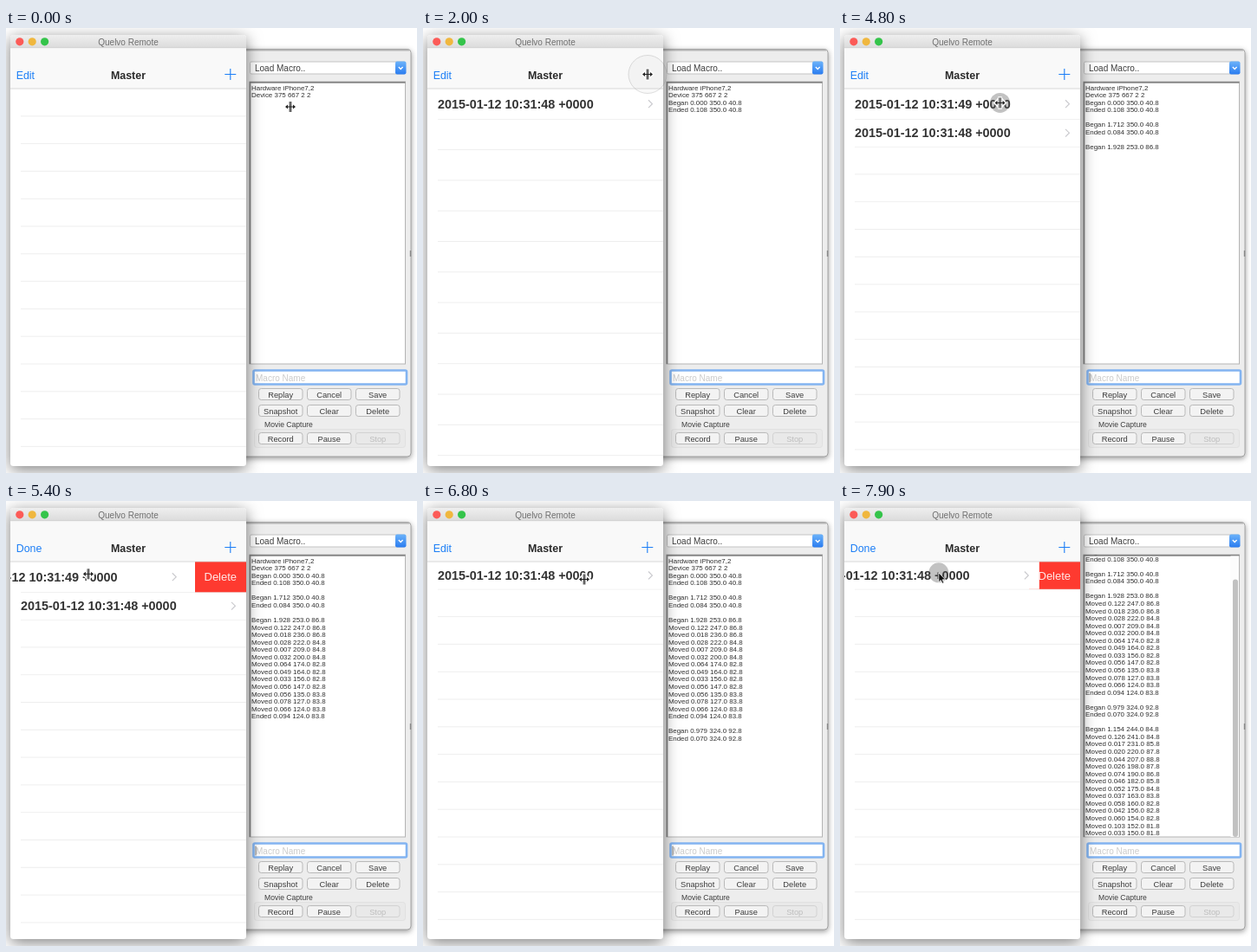
Write an HTML page that moves like this. It is 474x514 px and loops after 8 s.

```html
<!DOCTYPE html>
<html lang="en">
<head>
<meta charset="utf-8">
<title>Touch macro recorder</title>
<style>
  html, body { margin: 0; width: 100%; height: 100%; overflow: hidden; background: #fff; }
  svg { display: block; width: 474px; height: 514px; font-family: "Liberation Sans", Arial, sans-serif; }
  text { white-space: pre; }
  .panel { filter: drop-shadow(0 2px 3px rgba(0,0,0,.4)); }
  .phone { filter: drop-shadow(0 4px 9px rgba(0,0,0,.5)); }
</style>
</head>
<body>
<svg id="stage" viewBox="0 0 474 514">
  <defs>
    <linearGradient id="bar" x2="0" y2="1"><stop stop-color="#efefef"/><stop offset="1" stop-color="#dbdbdb"/></linearGradient>
    <linearGradient id="blue" x2="0" y2="1"><stop stop-color="#6cb3fa"/><stop offset="1" stop-color="#2a7cf0"/></linearGradient>
    <clipPath id="listClip"><path d="M5 23H277V506H5Z"/></clipPath>
    <clipPath id="logClip"><path d="M282 62.5H461V388H282Z"/></clipPath>
  </defs>
  <g id="panel"></g>
  <g clip-path="url(#logClip)"><g id="log"></g></g>
  <g id="scroller">
    <path d="M450.5 63.5H460V388H450.5Z" fill="#fcfcfc"/>
    <rect id="thumb" x="453" width="6" rx="3" fill="#c1c1c1"/>
  </g>
  <g id="phone"></g>
  <g clip-path="url(#listClip)"><g id="empty"></g><g id="rows"></g></g>
  <g id="nav"></g>
  <circle id="touch"/>
  <g id="cursor">
    <g id="split">
      <path d="M-1.6-6.5H1.6V-2H3V-4L7 0L3 4V2H1.6V6.5H-1.6V2H-3V4L-7 0L-3-4V-2H-1.6Z" fill="#fff" stroke="#fff" stroke-width="1.4"/>
      <path d="M-.8-6V6M.8-6V6M-5 0H5" stroke="#222" stroke-width="1" fill="none"/>
      <path d="M-6 0L-3-2.6V2.6ZM6 0L3-2.6V2.6Z" fill="#222"/>
    </g>
    <path id="arrow" d="M0 0V11L2.5 8.7L4.2 12.5L6 11.7L4.4 8H7.8Z" fill="#111" stroke="#fff" stroke-width=".8"/>
  </g>
</svg>
<script>
const LOOP = 8000, TOP = 70, BASE = 31.8, EXTRA = 3.5, REVEAL = 59, LINE = 8.55;
const $ = id => document.getElementById(id);
const clamp = v => Math.max(0, Math.min(1, v));
const ease = v => { v = clamp(v); return v * v * (3 - 2 * v); };
const out = v => 1 - (1 - clamp(v)) ** 3;
const lerp = (a, b, k) => a + (b - a) * k;

function el(parent, tag, attrs, content = '') {
  const node = document.createElementNS('http://www.w3.org/2000/svg', tag);
  set(node, attrs);
  node.textContent = content;
  return parent.appendChild(node);
}
function set(node, attrs) {
  for (const k in attrs) node.setAttribute(k, attrs[k]);
}
// y is the middle of the line
function label(parent, content, x, y, size, fill, more = {}) {
  return el(parent, 'text', { x, y: y + size * .36, 'font-size': size, fill, ...more }, content);
}
const rect = (parent, x, y, width, height, fill, more = {}) =>
  el(parent, 'rect', { x, y, width, height, fill, ...more });
const path = (parent, d, stroke, width = 1, more = {}) =>
  el(parent, 'path', { d, stroke, 'stroke-width': width, fill: 'none', ...more });
const middle = { 'text-anchor': 'middle' };

// Each event: delay in seconds, x, y in device points
const touches = [
  [1260, '0 350 40.8|.108 350 40.8'],
  [3060, '1.712 350 40.8|.084 350 40.8'],
  [4690, '1.928 253 86.8|.122 247 86.8|.018 236 86.8|.028 222 84.8|.007 209 84.8|.032 200 84.8|.064 174 82.8|' +
    '.049 164 82.8|.033 156 82.8|.056 147 82.8|.056 135 83.8|.078 127 83.8|.066 124 83.8|.094 124 83.8'],
  [6190, '.979 324 92.8|.070 324 92.8'],
  [7155, '1.154 244 84.8|.126 241 84.8|.017 231 85.8|.020 220 87.8|.044 207 88.8|.026 198 87.8|.074 190 86.8|' +
    '.046 182 85.8|.052 175 84.8|.037 163 83.8|.058 160 82.8|.042 156 82.8|.060 154 82.8|.103 152 81.8|.033 150 81.8', true]
].map(([start, text, open]) => {
  let at = start;
  const events = text.split('|').map((part, i, all) => {
    const [dt, px, py] = part.split(' ').map(Number);
    if (i) at += dt * 1000;
    const kind = !i ? 'Began' : i < all.length - 1 || open ? 'Moved' : 'Ended';
    return { at, x: 5 + px * .7253, y: 23.5 + py * .7253,
      line: `${kind} ${dt.toFixed(3)} ${px.toFixed(1)} ${py.toFixed(1)}` };
  });
  return { start, events, end: open ? LOOP : at, tap: events.length < 3 };
});
const [addB, addA, swipeA, remove, swipeB] = touches;

// Cursor path: hovering keys joined with the touch samples
const hover = (at, x, y) => ({ at, x, y, soft: true });
const track = [
  hover(0, 328, 91), hover(700, 259, 53.5), hover(4150, 259, 53.5), hover(4640, 188.5, 86.5),
  ...swipeA.events, hover(5460, 95, 84.5), hover(5980, 240, 90.8), hover(6300, 240, 90.8),
  hover(6800, 186, 90.5), hover(7100, 182, 85), ...swipeB.events
];
function cursorAt(t) {
  let i = track.findIndex(k => k.at > t);
  if (i < 0) return track[track.length - 1];
  const a = track[i - 1], b = track[i], raw = (t - a.at) / (b.at - a.at);
  const k = b.soft ? ease(raw) : raw;
  return { x: lerp(a.x, b.x, k), y: lerp(a.y, b.y, k) };
}

// Row offset while swiping: dead zone, then resistance past the button
function swipe(touch, t) {
  if (t < touch.start) return 0;
  const drag = Math.max(0, touch.events[0].x - cursorAt(Math.min(t, touch.end)).x - 21);
  const held = drag > REVEAL ? REVEAL + (drag - REVEAL) * .68 : drag;
  return t > touch.end ? lerp(held, REVEAL, ease((t - touch.end) / 300)) : held;
}

function buildPanel() {
  const p = $('panel');
  rect(p, 262, 24.5, 205, 470.5, '#ededed', { rx: 4, stroke: '#a2a2a2', class: 'panel' });
  path(p, 'M270 25.5H465', '#b4b4b4', 2);
  path(p, 'M466.5 257V264', '#888', 1.4);
  rect(p, 281.5, 39, 179, 14, '#fff', { stroke: '#c3c3c3', rx: 1.5 });
  label(p, 'Load Macro..', 287, 46.2, 10, '#3c3c3c');
  rect(p, 449, 38.5, 12.5, 15, 'url(#blue)', { rx: 2 });
  path(p, 'M452.8 45L455.2 47.5L457.6 45', '#fff', 1.3);
  rect(p, 281, 62, 179.5, 326, '#fff', { stroke: '#b4b4b4' });
  path(p, 'M281.5 388V62.8H460.5', '#858585', 1.7);
  rect(p, 285.5, 395.5, 176.5, 16, '#fff', { stroke: '#83b4f1', 'stroke-width': 2.6, rx: 1.5 });
  label(p, 'Macro Name', 288, 404.4, 10, '#cbcbcb');
  path(p, 'M288 398.5V409.5', '#777', 1, { id: 'caret' });
  label(p, 'Movie Capture', 298, 458.2, 8.6, '#3c3c3c');
  rect(p, 286.5, 463.5, 174, 21, '#e9e9e9', { stroke: '#e0e0e0', rx: 3 });
  [['Replay', 'Cancel', 'Save'], ['Snapshot', 'Clear', 'Delete'], ['Record', 'Pause', 'Stop']].forEach((names, r) =>
    names.forEach((name, c) => {
      const x = 291.5 + c * 56, y = [416.5, 435.5, 467.5][r], off = name === 'Stop';
      rect(p, x, y, 50.5, 13, off ? '#e9e9e9' : '#f3f3f3', { rx: 2.8, stroke: off ? '#d2d2d2' : '#b9b9b9' });
      label(p, name, x + 25.2, y + 6.8, 9.3, off ? '#bdbdbd' : '#3c3c3c', middle);
    }));
}

function buildPhone() {
  rect($('phone'), 5, 8, 272, 498, '#fff', { rx: 3.5, class: 'phone' });
  const n = $('nav');
  path(n, 'M5 23V11.5Q5 8 8.5 8H273.5Q277 8 277 11.5V23Z', 'none', 0, { fill: 'url(#bar)' });
  path(n, 'M5 23H277', '#c8c8c8', .8);
  ['#fc5b57', '#f0b73e', '#34c44a'].forEach((c, i) => el(n, 'circle', { cx: 15.8 + i * 14.4, cy: 15.8, r: 4.6, fill: c }));
  label(n, 'Quelvo Remote', 141, 16, 10, '#707070', middle);
  rect(n, 5, 23.4, 272, 46.6, '#f9f9f9');
  path(n, 'M5 70H277', '#cfcfcf', .8);
  label(n, 'Edit', 11.7, 54.3, 12.4, '#1c7ef6', { id: 'edit' });
  label(n, 'Master', 141, 54.3, 12.4, '#2a2a2a', { 'font-weight': 700, ...middle });
  path(n, 'M252.3 53.5H265.3M258.8 47V60', '#1c7ef6', 1.1);
}

// Rows are drawn around their own middle line
function buildRow(stamp) {
  const g = el($('rows'), 'g', {}), rule = path(g, 'M17 0H277', '#e0e0e0', .8);
  const red = rect(g, 277 - REVEAL, -17, REVEAL, 34, '#fe3a30');
  label(g, 'Delete', 247.3, 0, 13, '#ffe9e8', middle);
  const cover = rect(g, 5, -17, 272, 34, '#fff'), body = el(g, 'g', {});
  label(body, stamp, 17, 0, 14.4, '#333', { 'font-weight': 700 });
  path(body, 'M260 -4.4L264.4 0L260 4.4', '#cacace', 1.2);
  return (top, full, h, off, alpha, pressed) => {
    const span = { y: -full / 2, height: full };
    set(g, { transform: `translate(0 ${top + h - full / 2})`, opacity: alpha, display: alpha ? 'inline' : 'none' });
    set(red, { ...span, fill: pressed ? '#dc2f27' : '#fe3a30', visibility: off ? 'visible' : 'hidden' });
    set(cover, { ...span, x: 5 - Math.min(off, REVEAL) });
    set(body, { transform: `translate(${-off} 0)` });
    set(rule, { transform: `translate(0 ${full / 2})` });
  };
}

buildPanel();
buildPhone();
const rowB = buildRow('2015-01-12 10:31:48 +0000');
const rowA = buildRow('2015-01-12 10:31:49 +0000');
const rules = Array.from({ length: 14 }, () => path($('empty'), 'M17 0H277', '#eaeaea', .8));

const lines = [];
function addLine(content, at) {
  lines.push({ at, node: label($('log'), content, 283, 68.8 + lines.length * LINE, 7.95, '#303030') });
}
addLine('Hardware iPhone7,2', 0);
addLine('Device 375 667 2 2', 0);
touches.forEach((touch, i) => {
  if (i) addLine('', touch.start);
  touch.events.forEach(e => addLine(e.line, e.at));
});

function drawList(t) {
  const inB = ease((t - addB.end - 20) / 350), inA = ease((t - addA.end - 20) / 350);
  const gone = ease((t - remove.end - 20) / 350);
  const pitch = BASE + EXTRA * (inB - inA), tall = BASE + EXTRA;
  const hA = tall * inA * (1 - gone), hB = pitch * inB;
  const offA = swipe(swipeA, t), offB = swipe(swipeB, t);
  rowA(TOP, tall, hA, offA, inA * (1 - gone), t >= remove.start && t < remove.end + 150);
  rowB(TOP + hA, pitch, hB, offB, inB, false);
  rules.forEach((r, i) => set(r, { transform: `translate(0 ${TOP + hA + hB + pitch * (i + 1)})` }));
  $('edit').textContent = (offA > 0 && !gone) || offB > 0 ? 'Done' : 'Edit';
}

function drawLog(t) {
  let last = 0;
  lines.forEach((l, i) => {
    const on = t >= l.at;
    if (on) last = i;
    set(l.node, { visibility: on ? 'visible' : 'hidden' });
  });
  const scroll = Math.max(0, last * LINE - 314.4), size = 325 * 325 / (325 + scroll) - 2;
  set($('log'), { transform: `translate(0 ${-scroll})` });
  set($('scroller'), { display: scroll ? 'inline' : 'none' });
  set($('thumb'), { y: 388 - size, height: size });
}

function drawPointer(t) {
  const pos = cursorAt(t);
  set($('cursor'), { transform: `translate(${pos.x} ${pos.y})` });
  set($('split'), { display: t < 7500 ? 'inline' : 'none' });
  set($('arrow'), { display: t < 7500 ? 'none' : 'inline' });
  const now = touches.find(c => t >= c.start && t < c.end + (c.tap && c !== remove ? 650 : 0));
  const spread = now ? out((t - now.end) / 650) : 0;
  set($('touch'), {
    cx: pos.x, cy: pos.y, r: 11.5 + 10.5 * spread, display: now ? 'inline' : 'none',
    fill: '#555', 'fill-opacity': lerp(.36, .03, spread),
    stroke: '#777', 'stroke-width': .8, 'stroke-opacity': .3 * spread
  });
}

function draw(t) {
  drawList(t);
  drawLog(t);
  drawPointer(t);
  const beat = t % 1000;
  set($('caret'), { visibility: beat >= 400 && beat < 900 ? 'visible' : 'hidden' });
}

const began = performance.now();
function tick() {
  draw((performance.now() - began) % LOOP);
  requestAnimationFrame(tick);
}
tick();
</script>
</body>
</html>
```
